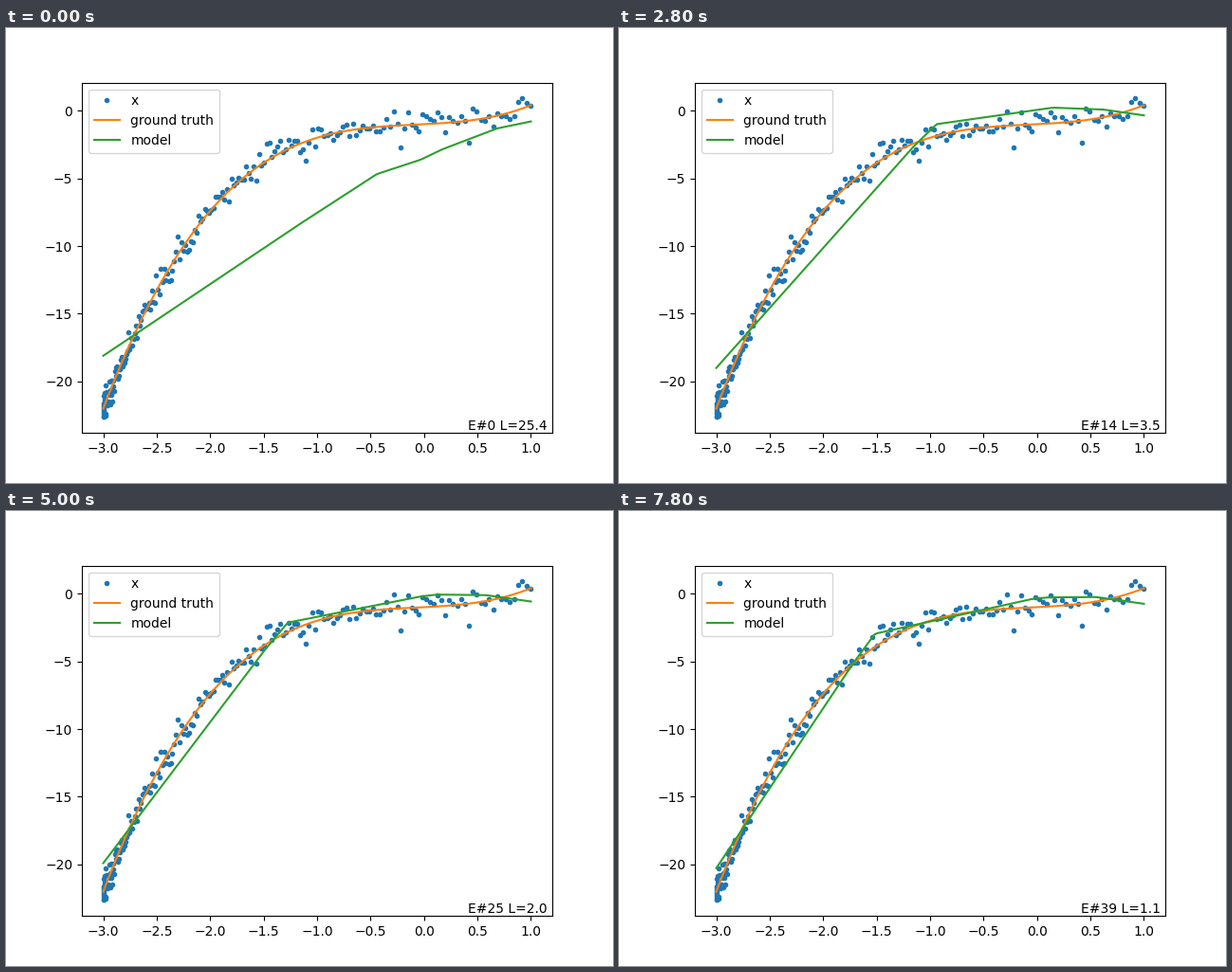
Write a matplotlib script that moves like this. It is 640 px wide and 480 px high and loops after 10000 ms.

```python
import numpy as np
import matplotlib.pyplot as plt
from matplotlib.animation import FuncAnimation

EPOCHS, FRAMES, STEP_MS = 40, 50, 200
COUNT = 200

# Corners of the fitted curve at the turning points of the training.
START = np.array([(-3, -18.1), (-1.2, -8.57), (-.44, -4.68), (-.03, -3.62),
                  (.17, -2.86), (.68, -1.32), (1, -.8)])
RAISED = np.array([(-3, -16.95), (-1.15, -4.2), (-.66, -1), (.01, .26),
                   (.31, 1.1), (.66, 1.45), (1, 1.55)])
BENT = np.array([(-3, -19), (-1.16, -2.7), (-.94, -1), (0, .06),
                 (.15, .22), (.62, .08), (1, -.35)])
FINAL = np.array([(-3, -20.27), (-1.72, -5.15), (-1.515, -2.96), (-.05, -.4),
                  (.1, -.28), (.55, -.25), (1, -.75)])


def truth(x):
    return 0.8 * x**3 + 0.2 * x**2 + 0.4 * x - 1


def samples(x):
    noise = np.random.default_rng(4).normal(0, 0.55, x.size)
    return np.clip(truth(x) + noise, -22.63, 0.9)


def mix(a, b, u):
    return a + (b - a) * u


def decay(a, b, u):
    return a * (b / a) ** u


def state(epoch):
    """Loss and curve corners after the given epoch."""
    if epoch < 5:  # fast rise with a small overshoot
        z = epoch / 5 - 1
        rise = 1 + 2.3 * z**3 + 1.3 * z**2
        return decay(25.4, 7.0, 1 - z**2), mix(START, RAISED, rise)
    if epoch < 14:
        u = (epoch - 5) / 9
        return decay(7.0, 3.5, u), mix(RAISED, BENT, u)
    u = (epoch - 14) / 25
    corners = mix(BENT, FINAL, 1 - (1 - u) ** 1.5)
    corners[0, 1] -= 0.45 * np.sin(2 * np.pi * u)  # left end wobbles
    return decay(3.5, 1.1, u + 0.9 * u**3 * (1 - u)), corners


xs = np.linspace(0, 2, COUNT) ** 2 - 3

fig, ax = plt.subplots(figsize=(6.4, 4.8), dpi=100)
ax.plot(xs, samples(xs), ".", color="C0", label="x")
ax.plot(xs, truth(xs), color="C1", label="ground truth")
model, = ax.plot([], [], color="C2", label="model")
note = ax.text(0.41, -23.6, "")
ax.set_xlim(-3.2, 1.2)
ax.set_ylim(-23.8, 2.07)
ax.legend(loc="upper left")


def draw(frame):
    epoch = min(frame, EPOCHS - 1)
    loss, corners = state(epoch)
    model.set_data(xs, np.interp(xs, *corners.T))
    note.set_text(f"E#{epoch} L={loss:.1f}")
    return model, note


anim = FuncAnimation(fig, draw, frames=FRAMES, interval=STEP_MS,
                     init_func=lambda: draw(0), repeat=True, repeat_delay=0)
plt.show()
```
